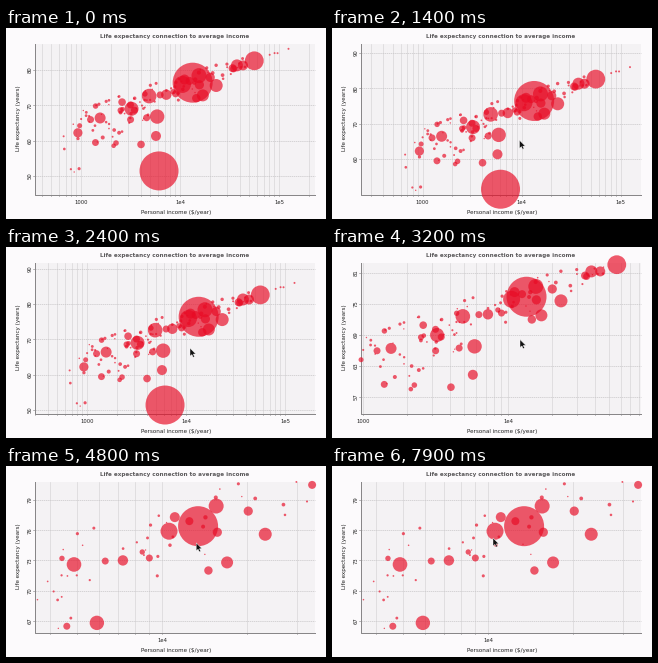
Write a matplotlib script that moves like this. It is 320 px wide and 191 px high and loops after 8 s.

```python
import numpy as np
import matplotlib.pyplot as plt
from matplotlib.animation import FuncAnimation
from matplotlib.patches import Polygon, Rectangle

W, H, DPI = 320, 191, 100
FRAMES, STEP = 80, 100
LEFT, RIGHT, TOP, BOTTOM = 28.5, 308.5, 15.5, 166.5
ZOOM = 1.1                  # one wheel notch
DECADE, YEAR = 99.0, 3.53   # pixels per decade and per year before zooming

# Main bubbles: income in thousands, life expectancy, radius in pixels
MAIN = np.array([
    (13.42, 76.4, 20), (6.14, 51.4, 19.5), (56.3, 82.6, 9.4), (10.59, 75.9, 8.5),
    (15.55, 78.4, 7.5), (4.88, 72.6, 7.3), (5.88, 66.8, 7.2), (3.24, 69, 7),
    (23.2, 75.6, 6.5), (17, 72.8, 6), (37.6, 81.3, 6), (1.56, 66.4, 5.5),
    (7.27, 73, 5.2), (43.3, 81.3, 5), (5.72, 61.3, 5), (11.1, 77.3, 5),
    (0.93, 62.2, 4.6), (20.2, 77.9, 4.6), (15.7, 75.8, 4.6), (14.6, 72, 4.2),
    (34, 80.5, 4), (12.5, 76.9, 4), (4.04, 58.9, 3.8), (2.6, 70.9, 3.8)])

# time, wheel notches, x of 1e4, y of 79 years
VIEW = np.array([
    (0, 0, 174, 45.5), (500, 0, 206, 53), (1000, 0, 199, 58), (1800, 0, 180, 69.6),
    (2800, 0, 180, 54.6), (3200, 4, 176, 36.3), (4000, 8, 167, 45.8),
    (4500, 11, 156, 34)])

# time, tip x, tip y
POINTER = np.array([
    (0, 174, 94), (500, 206, 101), (1000, 199, 106), (1800, 176, 118.5),
    (2700, 188, 92.5), (3200, 188, 92.5), (4000, 198, 82.5), (4500, 197, 82),
    (5600, 172, 63), (6000, 172, 63), (6300, 256, 54), (7000, 161, 61),
    (7500, 178, 56), (7900, 161, 72)])
ARROW = np.array([(0, 0), (0, 8), (1.9, 6.4), (3.1, 9.1), (4.5, 8.5),
                  (3.3, 5.9), (5.8, 5.8)])

TICK_PHASE = {6: 3, 4: 1, 3: 1}


def tween(keys, t):
    return [np.interp(t, keys[:, 0], col) for col in keys.T[1:]]


def make_bubbles(n=105):
    """Unzoomed offsets from (1e4, 79 years) and radii."""
    rng = np.random.default_rng(8)
    u = np.append(rng.uniform(-1.2, .68, n), rng.uniform(.7, 1.1, 4))
    trend = 75 + 11.5 * u - 1.5 * u ** 2
    life = trend + (2.6 - 2.2 * u) * np.clip(rng.normal(0, 1, len(u)), -2, 1.3)
    small = np.clip(.6 + rng.exponential(1.05, len(u)), .7, 3.5)
    small[n:] = 1

    income, age, big = MAIN.T
    u = np.concatenate([np.log10(income / 10), u])
    life = np.concatenate([age, life])
    xy = np.column_stack([u * DECADE, (79 - life) * YEAR])
    return xy, np.concatenate([big, small])


def text(x, y, s="", size=5.7, **kw):
    kw = {"ha": "center", "va": "center", "color": "#222222", **kw}
    return ax.text(x, y, s, fontsize=px(size), **kw)


def line(color, width, **kw):
    return ax.plot([], [], color=color, lw=px(width), **kw)[0]


def px(width):
    return width * 72 / DPI


plt.rcParams["font.family"] = "DejaVu Sans"
fig = plt.figure(figsize=(W / DPI, H / DPI), dpi=DPI, facecolor="#fcfafc")
ax = fig.add_axes([0, 0, 1, 1])
ax.set_xlim(0, W)
ax.set_ylim(H, 0)
ax.axis("off")

ax.add_patch(Rectangle((LEFT, TOP), RIGHT - LEFT, BOTTOM - TOP,
                       fc="#f4f2f4", ec="none"))
columns = line("#d8d6d8", .7, zorder=1)
rows = line("#c8c6c8", .7, ls=(0, (2, 1)), zorder=1)
marks = line("#888688", .6, zorder=1)
line("#888688", 1, zorder=1).set_data([LEFT, LEFT, RIGHT], [TOP, BOTTOM, BOTTOM])

offsets, radii = make_bubbles()
dots = ax.scatter(*offsets.T, color="#e80a24", alpha=.67, linewidths=0, zorder=2)

text(169, 8.5, "Life expectancy connection to average income", 5.6,
     weight="bold", color="#5c5a5c")
text(170, 184.5, "Personal income ($/year)")
text(12.5, 90, "Life expectancy (years)", rotation=90)
x_labels = [text(0, 174.5, s, 5.2) for s in ("1000", "1e4", "1e5")]
y_labels = [text(24, 0, size=5.2, rotation=90) for _ in range(8)]
arrow = ax.add_patch(Polygon(ARROW, fc="#111111", ec="white", lw=px(.4), zorder=5))


def x_ticks(x0, scale):
    exps = np.arange(2, 6)
    logs = (exps[:, None] + np.log10(np.arange(1, 10))).ravel()
    xs = x0 + (logs - 4) * DECADE * scale
    return xs[(xs > LEFT) & (xs < RIGHT)]


def y_ticks(y0, scale):
    year = YEAR * scale
    step = int(np.ceil((BOTTOM - TOP) / year / 5 - .05))
    step = 10 if step > 8 else step
    values = np.arange(TICK_PHASE.get(step, 0), 120, step)
    ys = y0 + (79 - values) * year
    keep = (ys > TOP + 1) & (ys < BOTTOM - 1)
    return values[keep], ys[keep]


def segments(lines):
    """Coordinates of separate lines, broken by gaps."""
    gap = (np.nan, np.nan)
    return np.array([p for a, b in lines for p in (a, b, gap)]).T


def place_dots(x0, y0, scale):
    """A bubble is drawn whole while its centre is inside the panel."""
    xy = offsets * scale + (x0, y0)
    inside = ((xy > (LEFT, TOP)) & (xy < (RIGHT, BOTTOM))).all(axis=1)
    dots.set_offsets(xy)
    dots.set_sizes(px(2 * radii * inside) ** 2)


def draw(i):
    t = i * STEP
    notches, x0, y0 = tween(VIEW, t)
    scale = ZOOM ** notches
    place_dots(x0, y0, scale)

    xs = x_ticks(x0, scale)
    values, ys = y_ticks(y0, scale)
    columns.set_data(*segments([((x, BOTTOM), (x, TOP)) for x in xs]))
    rows.set_data(*segments([((LEFT, y), (RIGHT, y)) for y in ys]))
    marks.set_data(*segments([((x, BOTTOM), (x, BOTTOM + 1.5)) for x in xs]
                             + [((LEFT - 1.5, y), (LEFT, y)) for y in ys]))

    for k, label in enumerate(x_labels):
        x = x0 + (k - 1) * DECADE * scale
        label.set_x(x)
        label.set_visible(LEFT < x < RIGHT)
    for label in y_labels:
        label.set_text("")
    for label, value, y in zip(y_labels, values, ys):
        label.set_text(str(value))
        label.set_y(y)

    arrow.set_xy(ARROW + tween(POINTER, t))
    arrow.set_visible(i > 0)
    return dots, columns, rows, marks, arrow, *x_labels, *y_labels


anim = FuncAnimation(fig, draw, frames=FRAMES, interval=STEP, repeat=True,
                     repeat_delay=0, blit=False)
plt.show()
```
